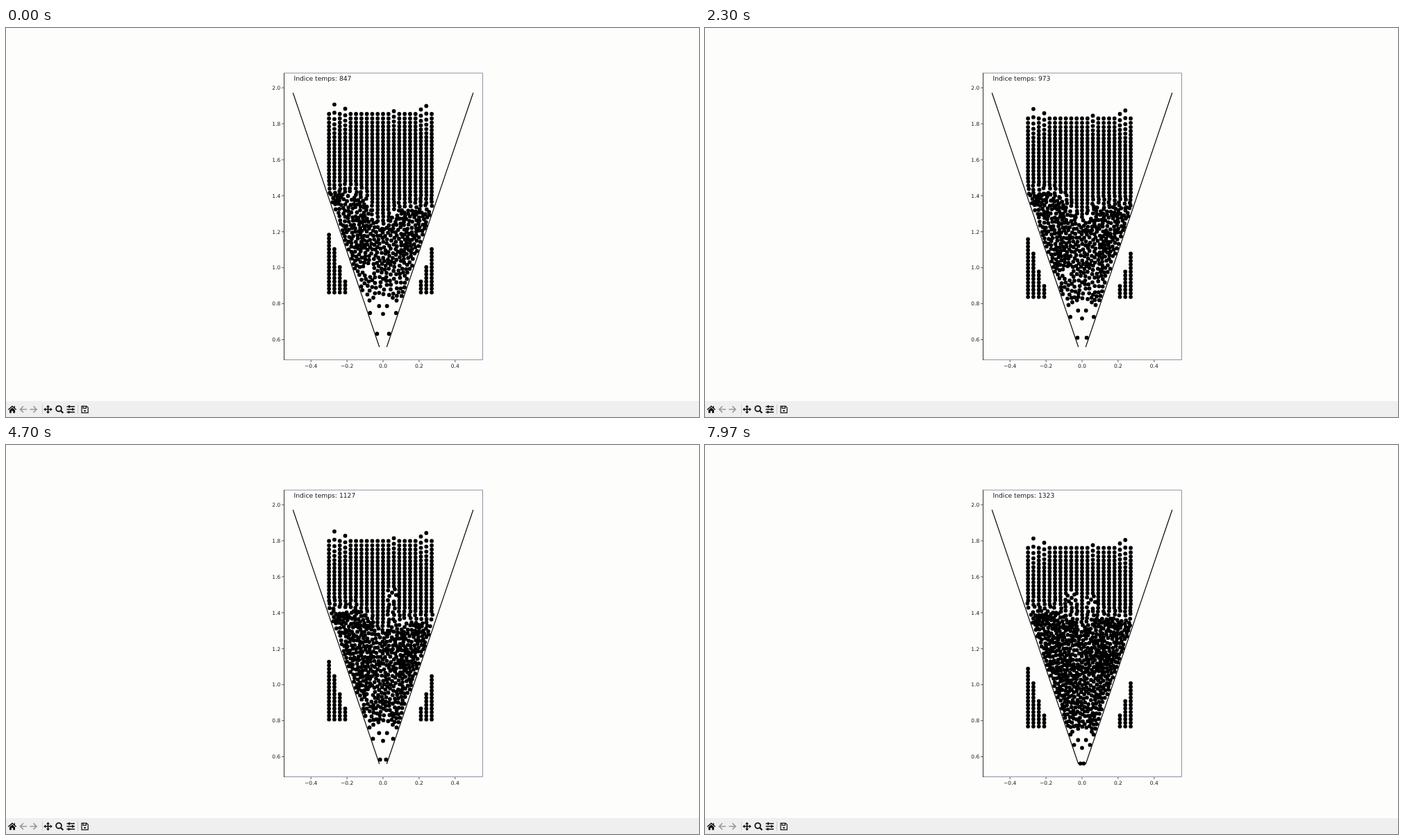
Animation of 998 by 561 pixels, one loop 8000 ms. Source, as an HTML page with a canvas:

```html
<!DOCTYPE html>
<html lang="fr">
<head>
<meta charset="utf-8">
<title>Silo</title>
<style>
  html, body { margin: 0; width: 100%; height: 100%; overflow: hidden; background: #fdfdfc; }
  svg, canvas { position: absolute; left: 0; top: 0; width: 998px; height: 561px; }
  text { font-family: "DejaVu Sans", sans-serif; fill: #1c1c1c; }
  .tick text { font-size: 7.5px; }
  .tick path { stroke: #333; stroke-width: .8; }
</style>
</head>
<body>
<svg viewBox="0 0 998 561">
  <rect y="538" width="998" height="23" fill="#efefef"/>
  <path d="M400 65H686.5V478.5H400" fill="none" stroke="#85859a" stroke-width=".9"/>
  <path d="M400.5 65V479" stroke="#333" stroke-width="1"/>
  <g id="ticks" class="tick"></g>
  <path d="M413.3 93.5L537.7 460M672.8 93.5L548.3 460" stroke="#000" stroke-width="1.15"/>
  <text id="counter" x="414.5" y="76.4" font-size="9.2"></text>

  <g fill="none" stroke="#111" stroke-width="1.4">
    <path d="M3.3 550.5L9 545.5L14.7 550.5" stroke-width="1.5"/>
    <path d="M5 551L9 547.4L13 551V555.3H10.2V552.3H7.8V555.3H5Z" fill="#111" stroke="none"/>
    <path d="M12.3 545.3V548" stroke-width="1.4"/>
    <g stroke="#999" stroke-width="1.7">
      <path d="M30 550H21M25 545.5L20.5 550L25 554.5"/>
      <path d="M34.5 550H43.5M39.5 545.5L44 550L39.5 554.5"/>
    </g>
    <path d="M52.5 543V557M103.5 543V557" stroke="#cfcfcf" stroke-width="1"/>
    <path d="M56 550H65M60.5 545.5V554.5" stroke-width="1.6"/>
    <path d="M60.5 543.7l2.5 3h-5zM60.5 556.3l2.5-3h-5zM54.2 550l3-2.5v5zM66.8 550l-3-2.5v5z" fill="#111" stroke="none"/>
    <circle cx="76" cy="549" r="3.9" stroke-width="1.8"/>
    <path d="M79 552L82.3 555.3" stroke-width="2.2"/>
    <path d="M87.5 546H99M87.5 550H99M87.5 554H99" stroke-width="1.3"/>
    <path d="M91 544.3V547.7M96 548.3V551.7M90.5 552.3V555.7" stroke-width="2"/>
    <path d="M109 545.3H116L118.2 547.5V554.8H109Z" stroke-width="1.2"/>
    <path d="M111 545.5V548.3H115.3V545.5" stroke-width="1.2"/>
    <circle cx="113.6" cy="552" r="1.3" fill="#111" stroke="none"/>
  </g>
</svg>
<canvas id="stage" width="998" height="561"></canvas>
<script>
const ctx = document.getElementById('stage').getContext('2d');
const counter = document.getElementById('counter');
const LOOP = 8000, TICK = 100 / 3, FIRST = 847, SPAN = 476;
const CENTER = 543, UNIT = 259.5, FALL = 0.0515;
const COLS = 20, ROWS = 50, COL = 0.03 * UNIT, ROW = 0.02 * UNIT, BASE = 381.3;

const clamp = (v, a, b) => Math.min(b, Math.max(a, v));
const ramp = (v, a, b) => clamp((v - a) / (b - a), 0, 1);
const colX = i => CENTER + (i - 10) * COL;
// Half of the room between the funnel walls, for grain centres
const room = y => 126.8 - (y - 93.5) * 0.3402;
const inside = (x, y) => clamp(x, CENTER - room(y), CENTER + room(y));

let seed = 20;
function random() {
  seed = (seed * 1664525 + 1013904223) % 4294967296;
  return seed / 4294967296;
}
const signed = () => random() * 2 - 1;

// Axis ticks
const label = n => n.toFixed(1).replace('-', '\u2212');
let marks = '';
for (let i = 0; i < 8; i++) {
  const y = 86.2 + i * 0.2 * UNIT;
  marks += `<path d="M397 ${y}H400"/><text x="395.3" y="${y + 2.7}" text-anchor="end">${label(2 - i * 0.2)}</text>`;
}
for (let i = -2; i <= 2; i++) {
  const x = CENTER + i * 0.2 * UNIT;
  marks += `<path d="M${x} 479V482"/><text x="${x}" y="490" text-anchor="middle">${label(i * 0.2)}</text>`;
}
document.getElementById('ticks').innerHTML = marks;

// The counter runs at an uneven pace between these times
const PACE = [[0, 847], [930, 896], [2300, 973], [3770, 1064], [4700, 1127], [6730, 1239], [7970, 1323]];
function countAt(t) {
  const i = clamp(PACE.findIndex(p => p[0] > t), 1, PACE.length - 1) || 1;
  const k = t >= PACE.at(-1)[0] ? PACE.length - 1 : i;
  const [a, from] = PACE[k - 1], [b, to] = PACE[k];
  return Math.round(from + (to - from) * ramp(t, a, b));
}

// Height where the falling columns meet the heap; the dip fills up
function surface(x, d) {
  const left = 1 - 0.5 * d / SPAN;
  return 239 + left * (22 * ramp(x, 505, 540) + 29 * Math.exp(-(((x - 541) / 14) ** 2)));
}

// A few columns are pushed up; the push fades row by row
const PUSH = { 1: 16.7, 3: 10.5, 12: 7, 17: 9.5, 18: 14.5 };
const columns = [], outside = [];
for (let i = 0; i < COLS; i++) {
  for (let j = 0; j < ROWS; j++) {
    const y = BASE - (ROWS - 1 - j) * ROW - (PUSH[i] || 3) * 0.6 ** j;
    if (y < 300) columns.push({ x: colX(i), y, jx: signed(), jy: signed() });
  }
  // Grains that started beyond the walls
  const stack = Math.floor(17.5 - 4.41 * Math.min(i, COLS - i));
  for (let k = 0; k < stack; k++) outside.push({ x: colX(i), y: BASE - k * ROW });
}

// Loose grains under the heap, mirrored: distance from the centre, height
const loose = [];
for (const [dx, y] of [[19.5, 393], [14, 389], [5.7, 401], [0, 412.3], [19, 411], [9, 441]]) {
  const speed = dx && y > 405 ? 0.88 : 1;
  for (const side of dx ? [-1, 1] : [1]) loose.push({ x: CENTER + side * dx, y, speed });
}

// Heap: seeded scatter with a minimum gap; late grains fill it up
const heap = [];
function scatter(tries, gapScale, late) {
  for (let n = 0; n < tries; n++) {
    const y = 215 + random() * 172, u = signed(), x = CENTER + u * room(y);
    const birth = late ? random() * SPAN : 0;
    const gap = gapScale * (4.35 + 1.2 * ramp(y, 310, 380));
    if (x < 463 || x > 615) continue;
    if (!late && Math.hypot(x - 522, y - 349) < 8.5) continue;
    const near = p => (p.x - x) ** 2 + (p.y - y) ** 2 < gap * gap;
    if (heap.some(near) || loose.some(near)) continue;
    heap.push({ x, y, u, birth, slip: 0.2 + 0.72 * ramp(y, 260, 385) });
  }
}
scatter(40000, 1, false);
scatter(12000, 0.82, true);

// Pockets that open inside the columns
const pockets = [{ x: 556, y: 198.5, from: 150 }, { x: 528, y: 196, from: 330 }];

function dot(x, y) {
  ctx.moveTo(x + 2.9, y);
  ctx.arc(x, y, 2.9, 0, Math.PI * 2);
}

function draw(t) {
  const count = countAt(t), d = count - FIRST, fall = d * FALL;
  counter.textContent = 'Indice temps: ' + count;

  ctx.clearRect(0, 0, 998, 561);
  ctx.beginPath();
  for (const g of outside) dot(g.x, g.y + fall);

  const open = pockets.filter(p => d >= p.from);
  for (const g of columns) {
    const y = g.y + fall, gap = surface(g.x, d) - y;
    if (gap < 0 || open.some(p => Math.hypot(g.x - p.x, g.y - p.y) < 8.5)) continue;
    let shake = 2.4 * ramp(gap, 28, 0) ** 2;
    if (open.some(p => Math.abs(g.x - p.x) < 9 && g.y > p.y)) shake = Math.max(shake, 1.3);
    dot(inside(g.x + g.jx * shake, y), y + g.jy * shake);
  }
  for (const p of open) {
    dot(p.x, p.y + fall);
    for (let a = 0.6; a < 6.2; a += Math.PI / 2) dot(p.x + 7 * Math.cos(a), p.y + 6 * Math.sin(a) + fall);
  }

  for (const g of heap) {
    const y = g.y + fall * g.slip, x = CENTER + g.u * room(y);
    if (g.birth <= d && y > surface(x, d)) dot(x, y);
  }

  for (const g of loose) {
    const y = Math.min(459.3, g.y + fall * g.speed);
    dot(inside(g.x, y), y);
  }
  ctx.fillStyle = '#000';
  ctx.fill();
}

const begin = performance.now();
function tick() {
  const t = (performance.now() - begin) % LOOP;
  draw(Math.floor((t + 5) / TICK) * TICK);
  requestAnimationFrame(tick);
}
tick();
</script>
</body>
</html>
```
